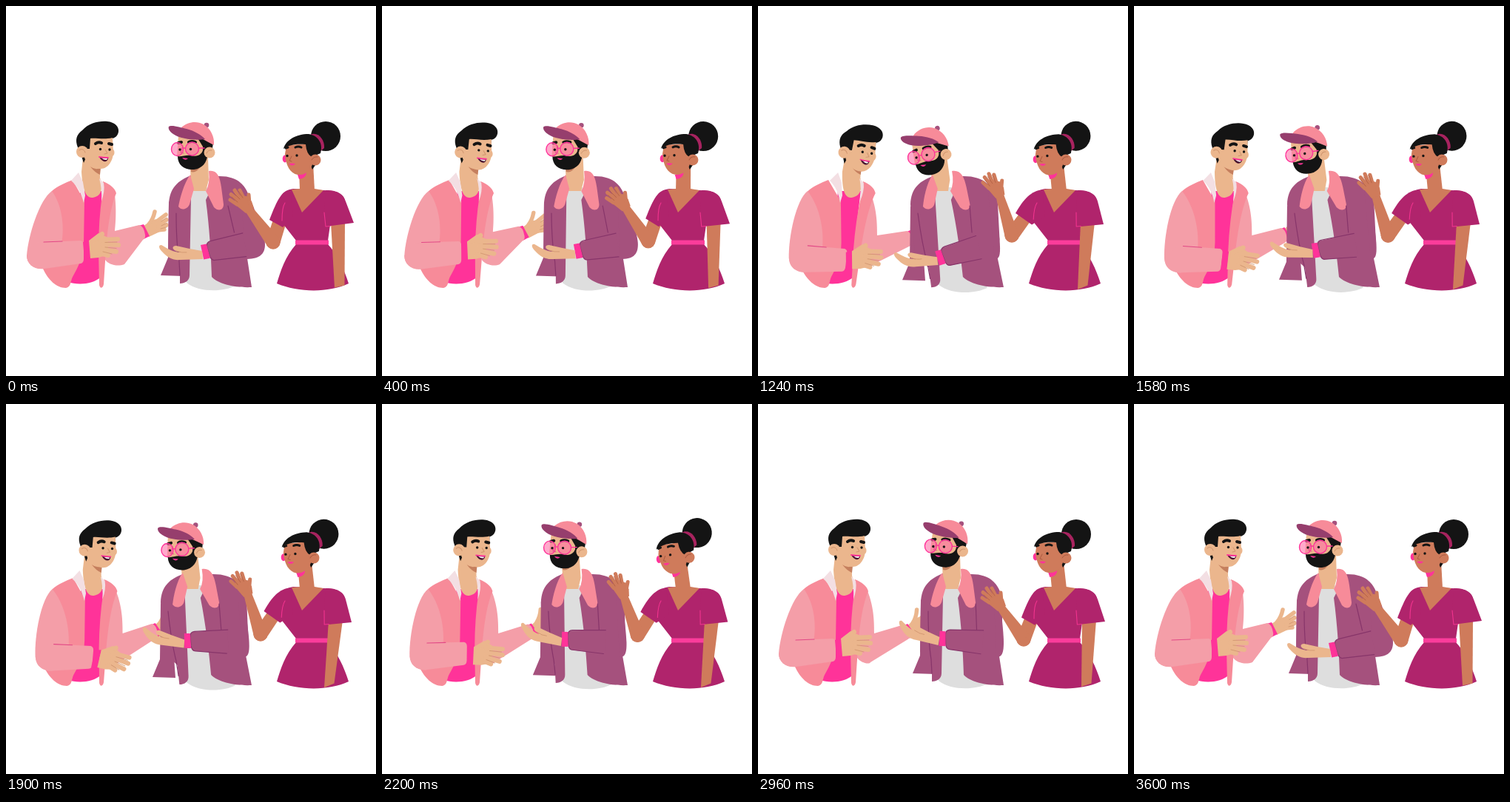
An HTML page with a canvas for the animation above (3640 ms loop, 500 by 500 pixels).

```html
<!DOCTYPE html>
<html>
<head>
<meta charset="utf-8">
<style>
html, body { margin: 0; width: 500px; height: 500px; overflow: hidden; background: #fff; }
canvas { display: block; }
</style>
</head>
<body>
<canvas id="stage" width="500" height="500"></canvas>
<script>
const c = document.getElementById('stage').getContext('2d');
c.lineCap = c.lineJoin = 'round';

const LOOP = 3640;
const KEYS = [0, 500, 760, 1240, 1900, 2520, 2960, 3600];
const BLACK = '#141414', TAN = '#ebb68d', BROWN = '#cf7b5b', HOT = '#ff3399', PINK = '#f78b99',
  LIGHT = '#f49ea8', PLUM = '#a5517d', SEAM = '#87356a', DRESS = '#b0246c', CREAM = '#f3dfe3';
let time = 0;

// Monotone cubic track through six poses, returning to the first one.
function k(...poses) {
  const v = [poses[0], poses[0] + (poses[1] - poses[0]) * .3, ...poses.slice(1), poses[0]];
  let i = 0;
  while (i < 6 && time >= KEYS[i + 1]) i++;
  const slope = j => j < 0 || j > 6 ? 0 : (v[j + 1] - v[j]) / (KEYS[j + 1] - KEYS[j]);
  const tangent = j => {
    const a = slope(j - 1), b = slope(j);
    return a * b > 0 ? 2 * a * b / (a + b) : 0;
  };
  const h = KEYS[i + 1] - KEYS[i], u = (time - KEYS[i]) / h, s = 1 - u;
  return v[i] * (1 + 2 * u) * s * s + v[i + 1] * u * u * (3 - 2 * u)
    + h * u * s * (s * tangent(i) - u * tangent(i + 1));
}

const bend = (d, warp) => new Path2D(warp
  ? d.replace(/(-?[\d.]+),(-?[\d.]+)/g, (_, x, y) => warp(+x, +y).join())
  : d);

function fill(color, d, warp) {
  c.fillStyle = color;
  c.fill(bend(d, warp));
}

function line(color, width, d, warp) {
  c.strokeStyle = color;
  c.lineWidth = width;
  c.stroke(bend(d, warp));
}

function dot(color, x, y, rx, ry = rx) {
  c.fillStyle = color;
  c.beginPath();
  c.ellipse(x, y, rx, ry, 0, 0, 7);
  c.fill();
}

// Draws a part turned by deg around (x, y) and moved by (dx, dy).
function turn(x, y, dx, dy, deg, draw) {
  c.save();
  c.translate(x + dx, y + dy);
  c.rotate(deg * Math.PI / 180);
  c.translate(-x, -y);
  draw();
  c.restore();
}

function limb(color, x1, y1, r1, x2, y2, r2) {
  const a = Math.atan2(y2 - y1, x2 - x1), nx = -Math.sin(a), ny = Math.cos(a);
  dot(color, x1, y1, r1);
  dot(color, x2, y2, r2);
  fill(color, `M${x1 + nx * r1} ${y1 + ny * r1}L${x2 + nx * r2} ${y2 + ny * r2}
    L${x2 - nx * r2} ${y2 - ny * r2}L${x1 - nx * r1} ${y1 - ny * r1}Z`);
}

function leftHead() {
  fill(BLACK, 'M105,212L102,203L97,191C93,181 95,174 103,168C112,158 126,155 137,156C147,157 153,163 152,170C151,176 147,178 144,179L144,187L110,200Z');
  dot(TAN, 143, 198, 3.5, 5);
  fill(TAN, 'M114,179C122,178 132,181 144,178L145,197C145,209 138,220 128,220C119,220 109,214 106,205L107,193L113,193Z');
  dot(TAN, 103, 197, 8);
  line('#cf946e', 1, 'M99,195C102,192 106,194 107,198');
  line(BLACK, 4, 'M121,186Q125,183 129,185M139,186L143,187');
  dot(BLACK, 127.5, 193.5, 1.7);
  dot(BLACK, 140, 194, 1.7);
  line('#cf946e', 1, 'M134,194L137,199L133,200');
  fill('#47122f', 'M126,204Q132,206 138,205C138,212 130,212 126,204Z');
  fill('#fff', 'M129,205.5L137,206L136,208Q132,208 129,205.5Z');
  line(HOT, 1.8, 'M126,204Q132,205 138,205');
}

function leftMan() {
  const lean = k(0, 1, 1, .15, 0, 0), reach = k(0, 1, 1, 1, 1, 1);
  const ex = k(0, 11, 14, 12, 6, 0), ey = k(0, 2, 4, 5, 2, 0);
  const cuffX = k(185, 207, 206, 202, 202.5, 202.5), cuffY = k(305, 314, 313, 306, 307, 307);
  const front = (x, y) => [x + lean * (7 + (y - 300) * .03), y];
  const collar = (x, y) => [x + lean * (10 - (y - 226) * .1), y];
  const flap = (x, y) => [x + lean * 11 * (381 - y) / 145, y];
  const upper = (x, y) => {
    const w = (y - 250) / 90;
    return [x + lean * 5 * (1 - w) + ex * w, y + ey * w];
  };

  // far arm
  turn(185, 305, cuffX - 185, cuffY - 305, -8 * reach, () => {
    fill(TAN, 'M186,297L198,289L210,287L212,303L193,312Z');
    line(TAN, 5.5, 'M193,295Q199,288 201,278M204,291L216,282M206,296L217,289M206,299L217,296M204,303L214,302');
    line('#cf946e', .8, 'M210,291L217,286M210,297L218,293M209,301L217,299');
    fill(HOT, 'M179,297L186,295L194,311L186,315Z');
  });
  fill(LIGHT, `M146,248C${150 + 7 * reach},272 ${148 + 9 * reach},295 ${147 + 10 * reach},${304 + 6 * reach}
    L${cuffX - 5},${cuffY - 9}Q${cuffX + 1},${cuffY - 8} ${cuffX + 3},${cuffY + 4}
    Q${cuffX + 4},${cuffY + 9} ${cuffX},${cuffY + 11}L${160 - 8 * reach},349C150,353 138,349 134,343L128,300Z`,
    (x, y) => x < 165 ? [x + lean * 4, y] : [x, y]);

  // body
  fill(HOT, 'M100,250L131,250L128,300L128,366C118,377 95,377 84,373L100,340Z', (x, y) => [x + lean * (381 - y) * .06, y]);
  fill(PINK, 'M131,237C141,241 147,246 149,253C140,274 136,310 134,345L132,376C131,382 127,382 126,377L125,330Q125,290 130,255Z', flap);
  fill(TAN, 'M104,205L127,209L127,232C131,246 130,257 117,259C106,260 103,242 102,224Z', flap);
  fill('#c57f5e', 'M114,217Q120,222 128,219L127,228Q120,225 114,217Z', flap);
  fill(CREAM, 'M126,233L132,239Q134,250 129,264Q130,247 126,233Z', flap);
  fill(PINK, 'M90,235C80,239 70,243 62,250C45,280 40,330 50,355C57,370 68,381 81,381C88,380 87,372 90,366C98,352 104,340 105,320L106,264Z', front);
  fill(CREAM, 'M98,225L88,236C97,244 102,254 105,266L107,256L104,238Z', collar);

  // near arm
  fill(LIGHT, 'M62,250C45,262 30,310 28,337C28,348 37,355 48,355L70,340C80,315 80,275 62,250Z', upper);
  turn(45, 338, ex, ey, k(0, 3, 7, 5, -3, 0), () => {
    fill(LIGHT, 'M42,320L76,318L101,317Q105,318 105,323L105,342Q105,347 101,348L52,355C38,357 28,349 28,337Z');
    line('#e24886', 1.1, 'M51,319L76,318');
  });
  turn(109, 330, k(0, 12, 14, 13, 6, 0), k(0, 6, 14, 14, 5, 0), k(0, 10, 4, 18, -4, 0), () => {
    fill(HOT, 'M104,319L112,317L114,341L106,343Z');
    fill(TAN, 'M112,317L125,307L138,313L138,336L125,340L114,341Z');
    line(TAN, 6, 'M118,317L130,308M128,316L151,315M130,322L152,323M130,329L149,332M126,334L138,337');
    line('#cf946e', .8, 'M134,319.5L150,319M134,326L149,327.5M131,332L143,335');
  });
  turn(115, 225, k(0, 10.5, 10, 3, 0, 0), k(0, 4.5, 2, 1, 0, 0), k(0, 10, 7, 1, 0, 0), leftHead);
}

function middleHead() {
  fill(BLACK, 'M234,172L262,174L280,184L279,192L270,208L255,205Z');
  fill(TAN, 'M233,176L258,177L266,190L266,206L240,207L231,203Z');
  fill(BLACK, 'M232,203C232,215 241,222 254,221C265,220 272,211 272,201L267,190C266,202 258,204 250,202C243,201 237,204 232,203Z');
  dot(TAN, 275, 198, 7.5);
  line('#cf946e', 1, 'M271,199Q273,194 278,195');
  dot(PLUM, 271, 161, 3.3);
  fill(PINK, 'M237,164C246,156 258,155 267,160C277,166 282,177 281,188C270,182 255,174 239,168Z');
  fill('#963e6d', 'M220,163C223,160 236,164 244,166C255,169 264,174 269,180C258,182 235,180 226,173C220,169 219,165 220,163Z');
  line(BLACK, 4, 'M233,185L237,184M247,184Q251,182 256,184');
  dot('#ff6fa899', 231.5, 193.5, 8, 9);
  dot('#ff6fa899', 251.5, 193, 9);
  line(HOT, 1.4, 'M223.5,193.5A8,9 0 1 0 239.5,193.5A8,9 0 1 0 223.5,193.5M242.5,193A9,9 0 1 0 260.5,193A9,9 0 1 0 242.5,193M239.5,192L242.5,192M260.5,192L268,192');
  dot(BLACK, 235, 194, 1.7);
  dot(BLACK, 249.5, 193.5, 1.7);
  line('#e84a8c', 1, 'M239,189L236,198L240,199');
  fill(HOT, 'M238,205L246,206Q242,210 238,205Z');
}

function middleMan() {
  const lean = k(0, 5, 14, 11, 0, 0), bulge = k(1, .24, .2, .24, .28, .28);
  const wx = k(269, 248, 246, 245, 249, 249), wy = k(332, 328, 340, 320, 317, 317);
  const body = (x, y) => [x - lean * (381 - y) / 140 * (.85 - (x - 250) / 250), y];
  const neck = (x, y) => [x - lean * (381 - y) / 140, y];
  const panel = (x, y) => [x - lean * Math.min(1, (381 - y) / 100) * (x < 240 ? 1 : .75),
    y + lean * .4 * Math.max(0, (y - 300) / 80)];

  fill(PLUM, 'M232,255L220,265L219,340L209,364L240,365Z', (x, y) => [x - lean, y + lean * .45]);
  fill('#dedede', 'M248,245L272,245L281,300L310,378C295,386 262,388 244,374L240,330Z',
    (x, y) => y > 350 ? [x, y + lean * .2] : body(x, y));
  fill(PLUM, 'M250,229C232,236 221,246 220,268L219,335L235,350L235,375C242,375 248,371 248,364L250,260Z', panel);
  fill(PLUM, 'M286,230C314,229 325,243 330,262L330,315L326,341L332,380C310,381 287,376 278,366C277,335 275,300 270,262Z', body);
  fill(PLUM, 'M318,240L328,256C340,285 350,310 350,322C350,337 341,342 322,342Z',
    (x, y) => body(x > 325 ? 325 + (x - 325) * bulge : x, y));
  line(SEAM, 1.2, 'M230,280Q230,320 234,345L235,364', panel);
  fill(TAN, 'M249,212L273,205L274,235L270,250L250,250Z', neck);
  fill('#c57f5e', 'M249,217L262,218Q257,226 250,224Z', neck);
  fill(PINK, 'M249,228C240,240 235,260 233,271C237,277 245,275 248,268L254,247Z', body);
  fill(PINK, 'M274,223C285,221 289,230 291,245L294,268C294,276 287,278 281,272L270,250Q276,240 274,223Z', body);
  line(SEAM, 1.2, `M${294 + 8 * (bulge - .25)},270L${295 + 18 * (bulge - .25)},306`, body);

  // forearm, cuff and open palm
  turn(269, 332, wx - 269, wy - 332, k(-12, -6, -17, -1, 3, 3), () => {
    fill(PLUM, 'M278,320L324,318L324,350L278,346Q274,345 274,338L273,325Q273,320 278,320Z');
    line(SEAM, 1.2, 'M324,318L279,319.5Q273,320 273,326L274,339Q275,346 280,346L322,350');
    fill(HOT, 'M265,322L273,322L274,342L265,342Z');
  });
  turn(269, 332, wx - 269, wy - 332, k(0, 2, -2, 9, 15, 15), () => {
    fill(TAN, 'M265,331L248,328L230,324C224,324 224,329 230,331L236,333C226,333 217,327 210,323C205,323 207,328 211,332C218,340 226,344 236,343L266,342Z');
    line('#cf946e', .8, 'M230,331Q238,334 244,333');
  });
  turn(275, 198, k(0, -8, -21, -13.5, 1.5, 1.5), k(0, 1, 2.5, 2.5, 1, 1), k(0, 0, -12, -2, 3.5, 3.5), middleHead);
}

function rightHead() {
  dot(BLACK, 432, 176, 20);
  fill('#a8235f', 'M411,174C421,169 431,180 430,192L424,197Z');
  dot(HOT, 377, 206.5, 3.3, 5);
  fill(BLACK, 'M409,208L420,212L414,221Z');
  fill(BROWN, 'M379,188L412,186L416,204C415,220 406,229 394,228C384,226 378,216 377,200Z');
  fill(BLACK, 'M375,193C378,181 392,173 409,173C422,175 429,186 425,199L413,204Q406,200 405,187C393,186 383,187 375,193Z');
  dot(BROWN, 418, 208, 7.5);
  line('#ac5b41', 1, 'M413,208Q416,203 421,204');
  line(BLACK, 3, 'M378,192L381,191M391,191Q395,189 399,191');
  dot(BLACK, 380, 202.5, 1.7);
  dot(BLACK, 393, 202, 1.7);
  line('#ac5b41', 1, 'M386,203L383,209L386,210');
  fill(HOT, 'M382,213Q386,212 391,213Q387,218 382,213Z');
}

function woman() {
  const hx = k(0, 9.5, -2, -2, -4, -2);
  const sx = k(0, 1, -8, -7.5, -5, 0), sy = k(0, -8, -9, -9, -6, -.5);
  const ex = k(361, 355, 343, 344, 348, 359), ey = k(319, 313, 310, 311, 315, 318);
  const px = k(329, 333, 327, 327, 328, 329), py = k(276, 263, 257, 258, 267, 276);
  const armTop = k(0, -2, -3, -3, -3, -1), armEnd = k(0, -14, -12, -14, -11, -7);
  const tipX = k(0, 0, -3, -3, -2, -1), tipY = k(0, 6, 2, 2, 1, 1);

  limb(BROWN, 371 + sx * .6, 287 + sy, 9, ex, ey, 9.5);
  limb(BROWN, ex, ey, 9.5, px, py, 5.5);
  turn(330, 276, px - 329, py - 276, k(0, -4, 10, 10, 22, 0), () => {
    fill(BROWN, 'M324,280L308,267L312,256L326,257L332,264L335,273Z');
    line(BROWN, 5, 'M312,268L303,262M313,262L304,254.5M316,260L309,249M321,259L316,249M329,267L328,255');
    line('#ac5b41', .7, 'M313,265L305,258M316,261L308,253M320,259L314,250');
  });

  fill(DRESS, 'M388,247C378,249 372,253 370,262L374,294L392,317L392,322C377,339 371,358 366,375C395,387 435,388 463,375C457,356 448,336 435,322L435,317L438,296L458,262C455,253 445,249 429,249Z');
  fill(DRESS, `M384,248C373,250 ${367 + sx * .6},${260 + sy * .6} ${356 + sx},${289 + sy}L${374 + sx * .5},${299 + sy * .4}L388,285Z`);
  fill(BROWN, 'M386,248L398,247L417,247L429,249L400,279Z');
  fill(BROWN, 'M396,220L415,212L417,249L397,249Z', (x, y) => [x + hx * Math.max(0, 250 - y) / 35, y]);
  fill(HOT, 'M394,228Q402,228 406,224Q406,233 396,234Z', (x, y) => [x + hx * .85, y]);
  fill('#fb3d9b', 'M391,316.5L436,316.5L436,322.5L391,322.5Z');
  fill(BROWN, `M${439 + armTop},292L${458 + armTop},292L${457.5 + armEnd},377.5L${444 + armEnd},${380.5 - armEnd * .2}Z`);
  fill(DRESS, `M432,249C450,249 456,255 459,264L${470 + tipX},${293 + tipY}L${432 + armTop * .4},${298 + tipY * .2}L430,275Z`);
  line('#f2348f', 1.1, `M377,266Q373,272 ${373 + sx * .1},${290 + sy * .2}M430,279L${432 + armTop * .6},298L${438 + armTop * .6},297.5`);
  turn(418, 208, hx, k(0, 0, 0, 0, -1.5, 0), k(0, 2, -1, -1, -11, 0), rightHead);
}

function frame() {
  time = Math.min(performance.now() % LOOP, 3600);
  c.clearRect(0, 0, 500, 500);
  leftMan();
  middleMan();
  woman();
  requestAnimationFrame(frame);
}
frame();
</script>
</body>
</html>
```
